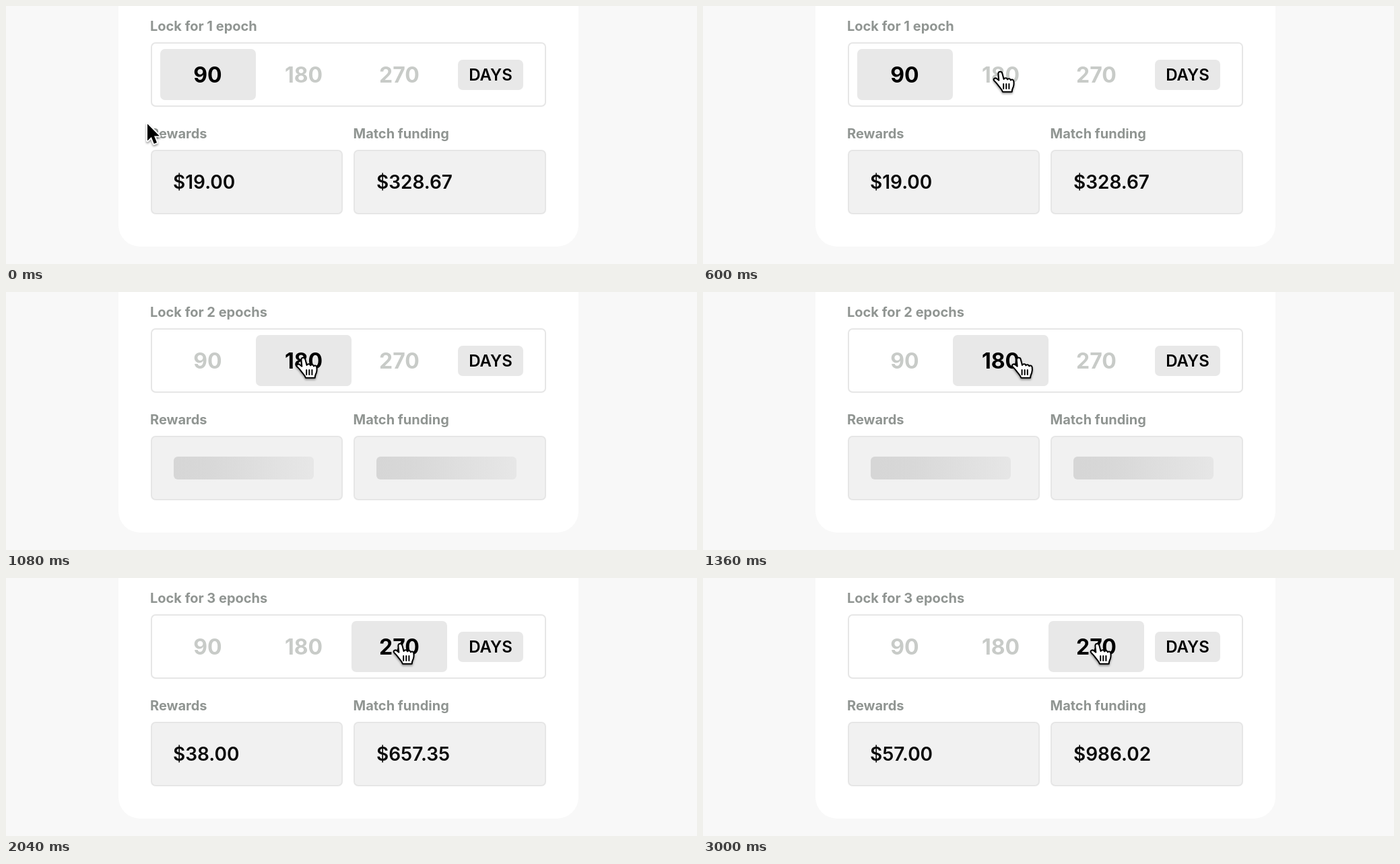
An HTML page that plays this animation: 1026x384 px, repeating every 3040 ms.

```html
<!DOCTYPE html>
<html lang="en">
<head>
<meta charset="utf-8">
<title>Lock period</title>
<style>
  html, body { margin: 0; width: 100%; height: 100%; overflow: hidden; background: #f8f8f8; }
  svg { display: block; width: 100%; height: 100%; }
  text { font-family: Inter, "Open Sans", sans-serif; font-weight: 600; }
  .label { font-size: 20px; font-weight: 700; fill: #909592; }
  .day { font-size: 32px; font-weight: 700; text-anchor: middle; }
  .unit { font-size: 24px; text-anchor: middle; }
  .value { font-size: 28px; fill: #0a0a0a; }
  .frame { stroke: #e6e6e6; stroke-width: 2; }
  #cursor { filter: drop-shadow(0 2px 1.5px rgba(0, 0, 0, .4)); }
</style>
</head>
<body>
<svg viewBox="0 0 1026 384">
  <defs>
    <linearGradient id="shade" gradientUnits="objectBoundingBox">
      <stop offset="0" stop-color="#d6d6d6"/>
      <stop offset=".25" stop-color="#d8d8d8"/>
      <stop offset="1" stop-color="#e7e7e7"/>
    </linearGradient>
  </defs>
  <rect width="1026" height="384" fill="#f8f8f8"/>
  <rect x="167" y="-60" width="683" height="418" rx="32" fill="#fff"/>

  <text id="title" class="label" x="214" y="37"></text>
  <rect class="frame" x="216" y="55" width="585" height="94" rx="6" fill="#fff"/>
  <rect id="slider" y="64" width="142" height="76" rx="7" fill="#e8e8e8"/>
  <text class="day" x="299.5" y="114">90</text>
  <text class="day" x="442" y="114">180</text>
  <text class="day" x="584" y="114">270</text>
  <rect x="671" y="80" width="97" height="45" rx="7" fill="#e8e8e8"/>
  <text class="unit" x="719.5" y="111">DAYS</text>

  <text class="label" x="214" y="197">Rewards</text>
  <text class="label" x="515.5" y="197">Match funding</text>
  <rect class="frame" x="216" y="215" width="283" height="94" rx="6" fill="#f1f1f1"/>
  <rect class="frame" x="517" y="215" width="284" height="94" rx="6" fill="#f1f1f1"/>
  <g id="values">
    <text class="value" x="248" y="272"></text>
    <text class="value" x="550" y="272"></text>
  </g>
  <g id="skeleton" fill="url(#shade)">
    <rect x="249" y="245" width="208" height="34" rx="6"/>
    <rect x="550" y="245" width="208" height="34" rx="6"/>
  </g>

  <g id="cursor">
    <path id="arrow" d="M1 2.5V27.5L6.8 22 10.8 32 15 30.2 11 20.6H18.8Z"
      stroke="#fff" stroke-width="4" stroke-linejoin="round" paint-order="stroke"/>
    <g id="hand" stroke="#000" stroke-width="2" stroke-linejoin="round" stroke-linecap="round">
      <path fill="#fff" d="M-2.6 3C-2.6-1 2.5-1.2 3.4 2.4L5.6 11c1-2.5 5-2.3 5.4.4 1-2 4.6-1.5 4.9 1 1-1.8 4-1 4.4 1.6.5 3 .6 5-.6 8.4-1 2.6-1.8 3.5-2 7.3H4c-1.2-3.8-4.5-6.5-6.6-9.6-2-3-4.6-5.3-6.3-7.3-1.6-2.3 1.5-4.6 4.2-2.6l3 2.5Z"/>
      <path fill="none" d="M5.2 18v7M9.3 18v7M13.4 18v7"/>
    </g>
  </g>
</svg>
<script>
const LOOP = 3040, STEP = 40;
const CLICKS = [626, 1740];
const LOADS = [[1010, 1520], [2130, 2640]];
const AMOUNTS = [['$19.00', '$328.67'], ['$38.00', '$657.35'], ['$57.00', '$986.02']];
const DAY_OFF = [200, 203, 200];

const $ = id => document.getElementById(id);
const days = [...document.querySelectorAll('.day')];
const values = [...document.querySelectorAll('.value')];
const clamp = v => Math.max(0, Math.min(1, v));
const part = (t, from, to) => clamp((t - from) / (to - from));
const smooth = u => u * u * (3 - 2 * u);

// cubic-bezier(.4, 0, .2, 1)
function ease(u) {
  let lo = 0, hi = 1, s = .5;
  for (let i = 0; i < 24; i++) {
    s = (lo + hi) / 2;
    const r = 1 - s;
    if (1.2 * r * r * s + .6 * r * s * s + s ** 3 < u) lo = s; else hi = s;
  }
  return u <= 0 ? 0 : u >= 1 ? 1 : s * s * (3 - 2 * s);
}

function drawCursor(t) {
  const enter = smooth(part(t, 20, 390));
  const cross = smooth(part(t, 1240, 1670));
  const x = 209 + 232 * enter + 144 * cross;
  const y = 173 - 75 * enter ** 2.3;
  const over = y < 140;
  $('cursor').setAttribute('transform', `translate(${x} ${y})`);
  $('arrow').style.display = over ? 'none' : '';
  $('hand').style.display = over ? '' : 'none';
}

function draw(t) {
  const pick = CLICKS.filter(c => t >= c).length;
  $('title').textContent = `Lock for ${pick + 1} epoch${pick ? 's' : ''}`;

  const slide = CLICKS.reduce((sum, c) => sum + ease(part(t, c, c + 300)), 0);
  $('slider').setAttribute('x', 229 + 142 * slide);

  days.forEach((day, i) => {
    const on = i ? ease(part(t, CLICKS[i - 1], CLICKS[i - 1] + 250)) : 1;
    const off = i < 2 ? ease(part(t, CLICKS[i], CLICKS[i] + 130)) : 0;
    const k = 1 - on * (1 - off);
    day.setAttribute('fill', `rgb(${DAY_OFF.map(c => Math.round(c * k))})`);
  });

  const load = LOADS.find(([from, to]) => t >= from && t < to);
  const done = LOADS.filter(([, to]) => t >= to).length;
  $('values').style.display = load ? 'none' : '';
  $('skeleton').style.display = load ? '' : 'none';
  values.forEach((v, i) => v.textContent = AMOUNTS[done][i]);
  if (load) {
    const drift = .09 * ((t - load[0]) / 500) ** 2;
    $('shade').setAttribute('gradientTransform', `translate(${drift} 0)`);
  }

  drawCursor(t);
}

const start = performance.now();
function tick() {
  const t = (performance.now() - start) % LOOP;
  draw(Math.floor(t / STEP) * STEP);
  requestAnimationFrame(tick);
}
tick();
</script>
</body>
</html>
```
